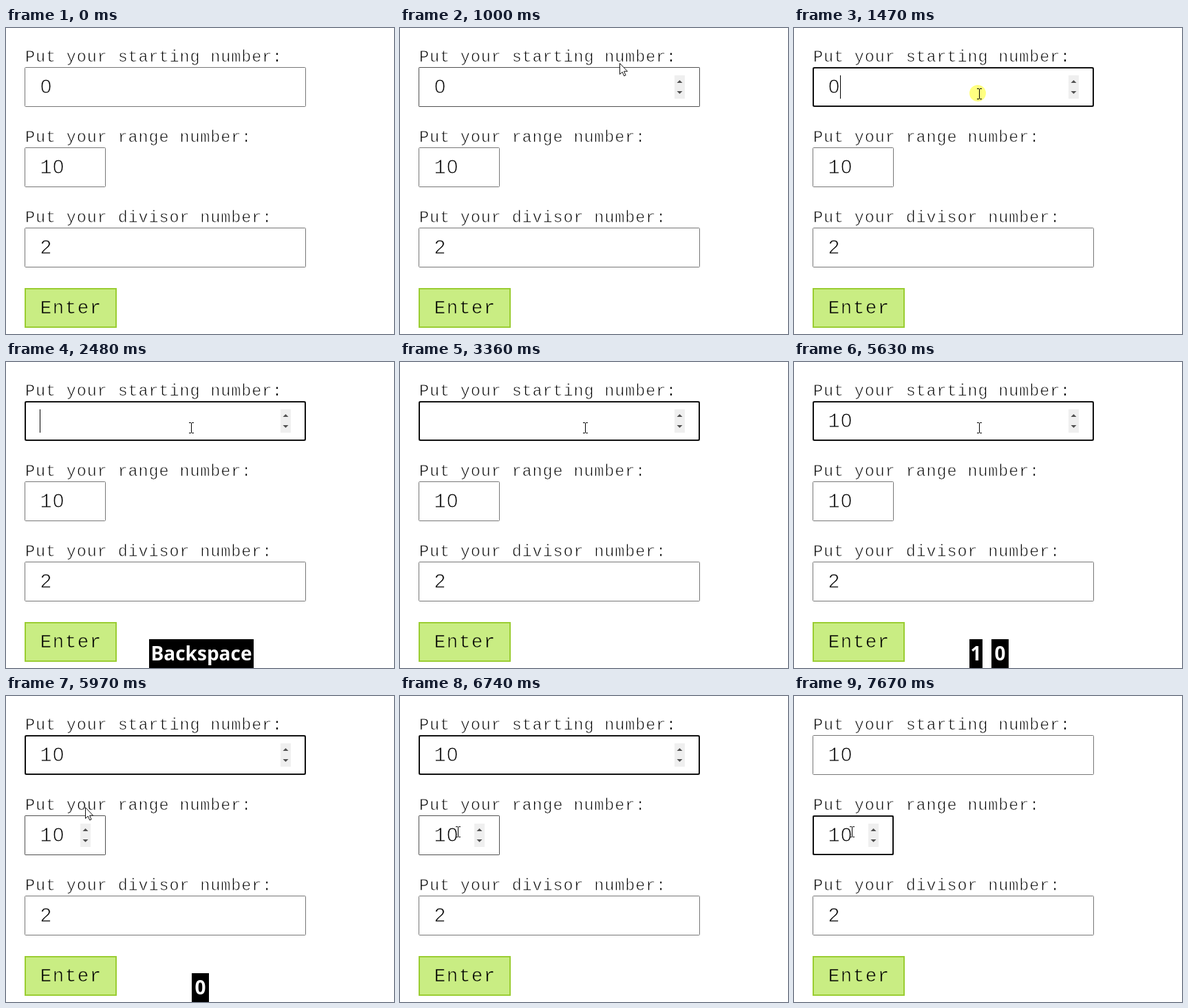
These frames come from a looping animation (564x446 px, 8 s). An HTML page:

```html
<!DOCTYPE html>
<html lang="en">
<head>
<meta charset="utf-8">
<title>Number form</title>
<style>
html, body { margin: 0; width: 100%; height: 100%; overflow: hidden; background: #fff; }
svg { display: block; width: 564px; height: 446px; }

/* A background-coloured outline thins the letters. */
text { font-family: "Liberation Mono", "Courier New", monospace; fill: #000; stroke: #fff; white-space: pre; }
.label { font-size: 23.5px; letter-spacing: .86px; stroke-width: .75px; }
.value { font-size: 29px; letter-spacing: .6px; stroke-width: .9px; }
.nought { font-family: "Liberation Sans", Arial, sans-serif; text-anchor: middle; letter-spacing: 0; }
.button text { font-size: 27.5px; letter-spacing: 1.5px; stroke: #c9ed83; stroke-width: .7px; }
.button rect { fill: #c9ed83; stroke: #9acd32; stroke-width: 2px; }
.box { fill: #fff; stroke: #767676; }
.hover { fill: none; stroke: #4f4f4f; }
.focus { fill: none; stroke: #101010; stroke-width: 2px; }
.key text { font: bold 28px "Open Sans", "Noto Sans", sans-serif; fill: #fff; stroke: none; text-anchor: middle; }

/* Everything switches hard on one shared 8 s clock. */
.a { visibility: hidden; animation: 8s step-end infinite; }
#zero { animation-name: zero; }
#one { animation-name: one; }
#ten { animation-name: ten; }
#startHover { animation-name: startHover; }
#startSpin { animation-name: startSpin; }
#startFocus { animation-name: startFocus; }
#rangeHover { animation-name: rangeHover; }
#rangeFocus { animation-name: rangeFocus; }
#caret { animation-name: caret; }
#click { animation-name: click; }
#keyBack { animation-name: keyBack; }
#keyOne { animation-name: keyOne; }
#keyZero { animation-name: keyZero; }
.pointer { animation: move 8s step-end infinite; }
#arrow { animation-name: arrow; }
#beam { animation-name: beam; }

@keyframes zero { 0% { visibility: visible } 31%, 100% { visibility: hidden } }
@keyframes one { 0% { visibility: hidden } 60.375%, 100% { visibility: visible } }
@keyframes ten { 0% { visibility: hidden } 63.75%, 100% { visibility: visible } }

@keyframes startHover { 0% { visibility: hidden } 11.625% { visibility: visible } 17.5%, 100% { visibility: hidden } }
@keyframes startSpin { 0% { visibility: hidden } 11.625% { visibility: visible } 89.25%, 100% { visibility: hidden } }
@keyframes startFocus { 0% { visibility: hidden } 17.5% { visibility: visible } 89.25%, 100% { visibility: hidden } }
@keyframes rangeHover { 0% { visibility: hidden } 73.75%, 100% { visibility: visible } }
@keyframes rangeFocus { 0% { visibility: hidden } 89.25%, 100% { visibility: visible } }

@keyframes caret {
  0% { visibility: hidden; transform: translate(67px, 69px) }
  17.5% { visibility: visible; transform: translate(67px, 69px) }
  25% { visibility: hidden; transform: translate(67px, 69px) }
  31% { visibility: visible; transform: translate(49px, 69px) }
  37.625% { visibility: hidden; transform: translate(49px, 69px) }
  44.5% { visibility: visible; transform: translate(49px, 69px) }
  51.25% { visibility: hidden; transform: translate(49px, 69px) }
  57.875% { visibility: visible; transform: translate(49px, 69px) }
  60.375% { visibility: visible; transform: translate(67px, 69px) }
  63.75% { visibility: visible; transform: translate(85px, 69px) }
  70.375% { visibility: hidden; transform: translate(85px, 69px) }
  77% { visibility: visible; transform: translate(85px, 69px) }
  83.625% { visibility: hidden; transform: translate(85px, 69px) }
  89.25% { visibility: visible; transform: translate(85px, 186px) }
  95.875%, 100% { visibility: hidden; transform: translate(85px, 186px) }
}

@keyframes click {
  0% { visibility: hidden }
  17.5% { visibility: visible }
  20% { visibility: hidden }
  89.25% { visibility: visible }
  91.75%, 100% { visibility: hidden }
}

@keyframes keyBack { 0% { visibility: hidden } 31% { visibility: visible } 42%, 100% { visibility: hidden } }
@keyframes keyOne {
  0% { visibility: hidden; transform: translateX(283.5px) }
  61.25% { visibility: visible; transform: translateX(283.5px) }
  63.75% { visibility: visible; transform: translateX(264.5px) }
  72.125%, 100% { visibility: hidden; transform: translateX(264.5px) }
}
@keyframes keyZero {
  0% { visibility: hidden; transform: translateX(299.5px) }
  63.75% { visibility: visible; transform: translateX(299.5px) }
  72.125% { visibility: visible; transform: translateX(282.5px) }
  76.25%, 100% { visibility: hidden; transform: translateX(282.5px) }
}

@keyframes move {
  0% { transform: translate(349px, 21px) }
  8.25% { transform: translate(346px, 24px) }
  9.125% { transform: translate(344px, 27px) }
  11.625% { transform: translate(339px, 33px) }
  12.5% { transform: translate(319px, 51px) }
  13.375% { transform: translate(294px, 74px) }
  14.125% { transform: translate(276px, 90px) }
  15% { transform: translate(269px, 96px) }
  71.25% { transform: translate(258px, 99px) }
  72.125% { transform: translate(224px, 111px) }
  72.875% { transform: translate(174px, 135px) }
  73.75% { transform: translate(133px, 153px) }
  74.625% { transform: translate(115px, 162px) }
  76.25% { transform: translate(107px, 172px) }
  77% { transform: translate(101px, 183px) }
  77.875% { transform: translate(97px, 191px) }
  78.75% { transform: translate(95px, 195px) }
  80% { transform: translate(93px, 197px) }
  80.75% { transform: translate(91px, 197px) }
  81.625% { transform: translate(89px, 198px) }
  82.5% { transform: translate(86px, 198px) }
  84.25%, 100% { transform: translate(84px, 198px) }
}
@keyframes arrow {
  0% { visibility: hidden }
  7.375% { visibility: visible }
  13.375% { visibility: hidden }
  72.875% { visibility: visible }
  77%, 100% { visibility: hidden }
}
@keyframes beam {
  0% { visibility: hidden }
  13.375% { visibility: visible }
  72.875% { visibility: hidden }
  77%, 100% { visibility: visible }
}
</style>
</head>
<body>
<svg viewBox="0 0 564 446">
  <defs>
    <g id="spinner">
      <path fill="#efefef" d="M0 0h15v34H0z"/>
      <path fill="#505050" d="M3.5 11l4-4 4 4zM3.5 23l4 4 4-4z"/>
    </g>
  </defs>

  <text class="label" x="28" y="49">Put your starting number:</text>
  <rect class="box" x="27.5" y="57.5" width="408" height="57" rx="1"/>
  <rect class="hover a" id="startHover" x="27.5" y="57.5" width="408" height="57" rx="1"/>
  <rect class="focus a" id="startFocus" x="28" y="58" width="407" height="56" rx="2"/>
  <g class="a" id="startSpin"><use href="#spinner" x="399" y="69"/></g>

  <text class="label" x="28" y="166">Put your range number:</text>
  <rect class="box" x="27.5" y="174.5" width="117" height="57" rx="1"/>
  <g class="a" id="rangeHover">
    <rect class="hover" x="27.5" y="174.5" width="117" height="57" rx="1"/>
    <use href="#spinner" x="108" y="186"/>
  </g>
  <rect class="focus a" id="rangeFocus" x="28" y="175" width="116" height="56" rx="2"/>

  <text class="label" x="28" y="283">Put your divisor number:</text>
  <rect class="box" x="27.5" y="291.5" width="408" height="57" rx="1"/>

  <g class="button">
    <rect x="28" y="380" width="132" height="56"/>
    <text x="49.7" y="416">Enter</text>
  </g>

  <!-- click highlight, beneath the text -->
  <g class="pointer">
    <circle class="a" id="click" cx="-2" cy="-1" r="12" fill="#ffff80"/>
  </g>

  <text class="value nought a" id="zero" x="58" y="95">0</text>
  <text class="value a" id="one" x="49.3" y="95">1</text>
  <text class="value nought a" id="ten" x="76" y="95">0</text>
  <text class="value" x="49.3" y="212">1</text>
  <text class="value nought" x="76" y="212">0</text>
  <text class="value" x="49.3" y="329">2</text>

  <rect class="a" id="caret" width="1" height="34" fill="#000"/>

  <g class="key a" id="keyBack">
    <rect x="208" y="404" width="152" height="42"/>
    <text x="284" y="435">Backspace</text>
  </g>
  <g class="key a" id="keyOne">
    <rect x="-9.5" y="404" width="19" height="42"/>
    <text y="435">1</text>
  </g>
  <g class="key a" id="keyZero">
    <rect x="-12.5" y="404" width="25" height="42"/>
    <text y="435">0</text>
  </g>

  <g class="pointer">
    <path class="a" id="arrow" fill="#fff" stroke="#111" d="M.5 .5v16l3.7-3.4 2.5 5.8 2.4-1-2.5-5.7h5z"/>
    <path class="a" id="beam" fill="none" stroke="#000" d="M-3-7.5h3M1-7.5h3M-3 7.5h3M1 7.5h3M.5-7v14"/>
  </g>
</svg>
</body>
</html>
```
